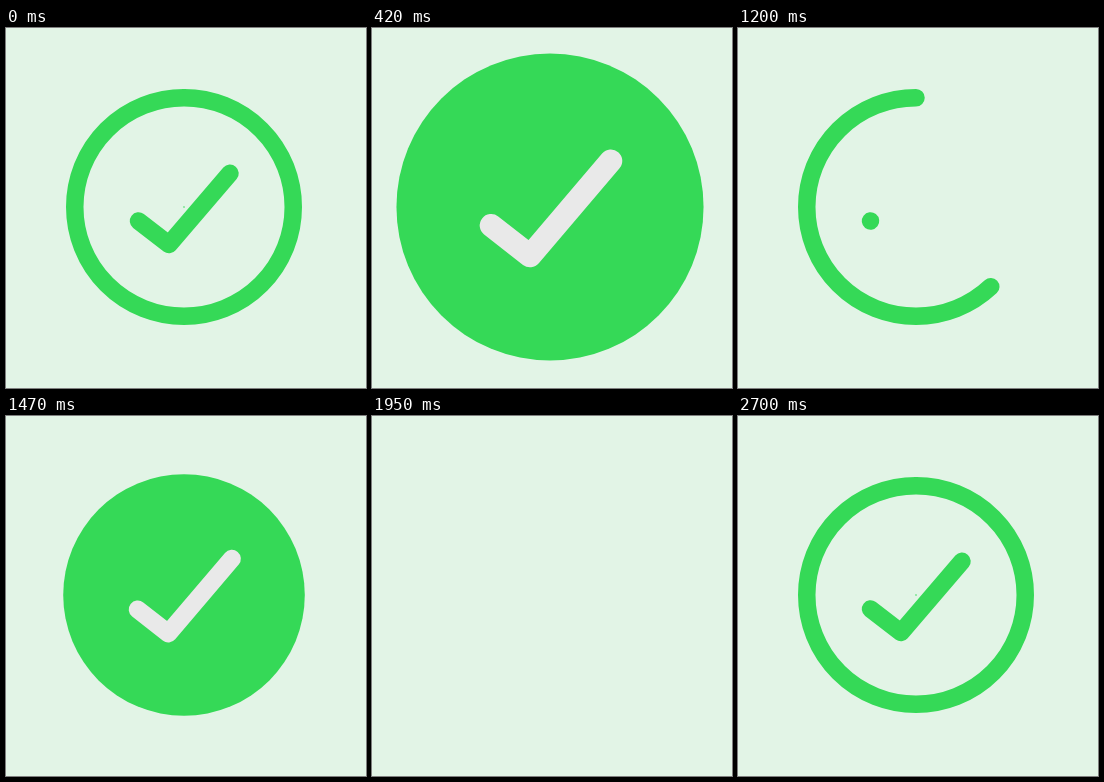
An HTML page with a canvas that plays this animation: 360 px wide and 360 px high, repeating every 2730 ms.

```html
<!DOCTYPE html>
<html lang="en">
<head>
<meta charset="utf-8">
<title>Check mark</title>
<style>
  html, body { margin: 0; width: 100%; height: 100%; overflow: hidden; background: #e2f4e6; }
  canvas { display: block; width: 360px; height: 360px; }
</style>
</head>
<body>
<canvas id="stage" width="360" height="360"></canvas>
<script>
const ctx = document.getElementById('stage').getContext('2d');
const LOOP = 2730, CYCLE = 1350, STEP = 30, OFFSET = 420;
const BACK = '#e2f4e6', GREEN = '#35d957', PALE = '#e9e9e9';
const CX = 178, CY = 179, RING_RADIUS = 109.25, DISC_RADIUS = 154;
const SMALL_CHECK = [[132.5, 193], [163, 216.5], [224, 145.3]];
const LARGE_CHECK = [[119, 197.5], [158, 228], [239, 132.8]];

const progress = (time, start, end) => Math.min(1, Math.max(0, (time - start) / (end - start)));
const smooth = x => x * x * (3 - 2 * x);

function strokeCheck(points, color, width, amount = 1) {
  const [a, b, c] = points;
  const length = Math.hypot(b[0] - a[0], b[1] - a[1]) + Math.hypot(c[0] - b[0], c[1] - b[1]);
  ctx.beginPath();
  points.forEach(([x, y]) => ctx.lineTo(x, y));
  ctx.strokeStyle = color;
  ctx.lineWidth = width;
  ctx.setLineDash(amount < 1 ? [Math.max(0.01, length * amount), 1000] : []);
  ctx.stroke();
  ctx.setLineDash([]);
}

function drawOutline(time) {
  // The ring runs counterclockwise from the top.
  const turn = Math.max(0.0001, progress(time, 0, 390) ** 1.3);
  const top = -Math.PI / 2;
  ctx.beginPath();
  ctx.arc(CX, CY, RING_RADIUS, top, top - turn * Math.PI * 2, true);
  ctx.strokeStyle = GREEN;
  ctx.lineWidth = 17.5;
  ctx.stroke();
  strokeCheck(SMALL_CHECK, GREEN, 17.5, smooth(progress(time, 270, 420)));
}

function drawBadge(scale) {
  if (scale <= 0) return;
  ctx.save();
  ctx.translate(CX, CY);
  ctx.scale(scale, scale);
  ctx.translate(-CX, -CY);
  ctx.beginPath();
  ctx.arc(CX, CY, DISC_RADIUS, 0, Math.PI * 2);
  ctx.fillStyle = GREEN;
  ctx.fill();
  strokeCheck(LARGE_CHECK, PALE, 23, 1);
  ctx.restore();
}

function draw(now) {
  const tick = Math.floor((now % LOOP) / STEP) * STEP;
  const time = (tick + OFFSET) % CYCLE;
  ctx.fillStyle = BACK;
  ctx.fillRect(0, 0, 360, 360);
  ctx.lineCap = ctx.lineJoin = 'round';
  if (time < 660) drawOutline(time);
  const grow = 1 - (1 - progress(time, 415, 660) ** 1.7) ** 4;
  const shrink = 1 - progress(time, 810, 1020) ** 3;
  drawBadge(grow * shrink);
}

let start = null;
function loop(now) {
  if (start === null) start = now;
  draw(Math.max(0, now - start));
  requestAnimationFrame(loop);
}
draw(0);
requestAnimationFrame(loop);
</script>
</body>
</html>
```
